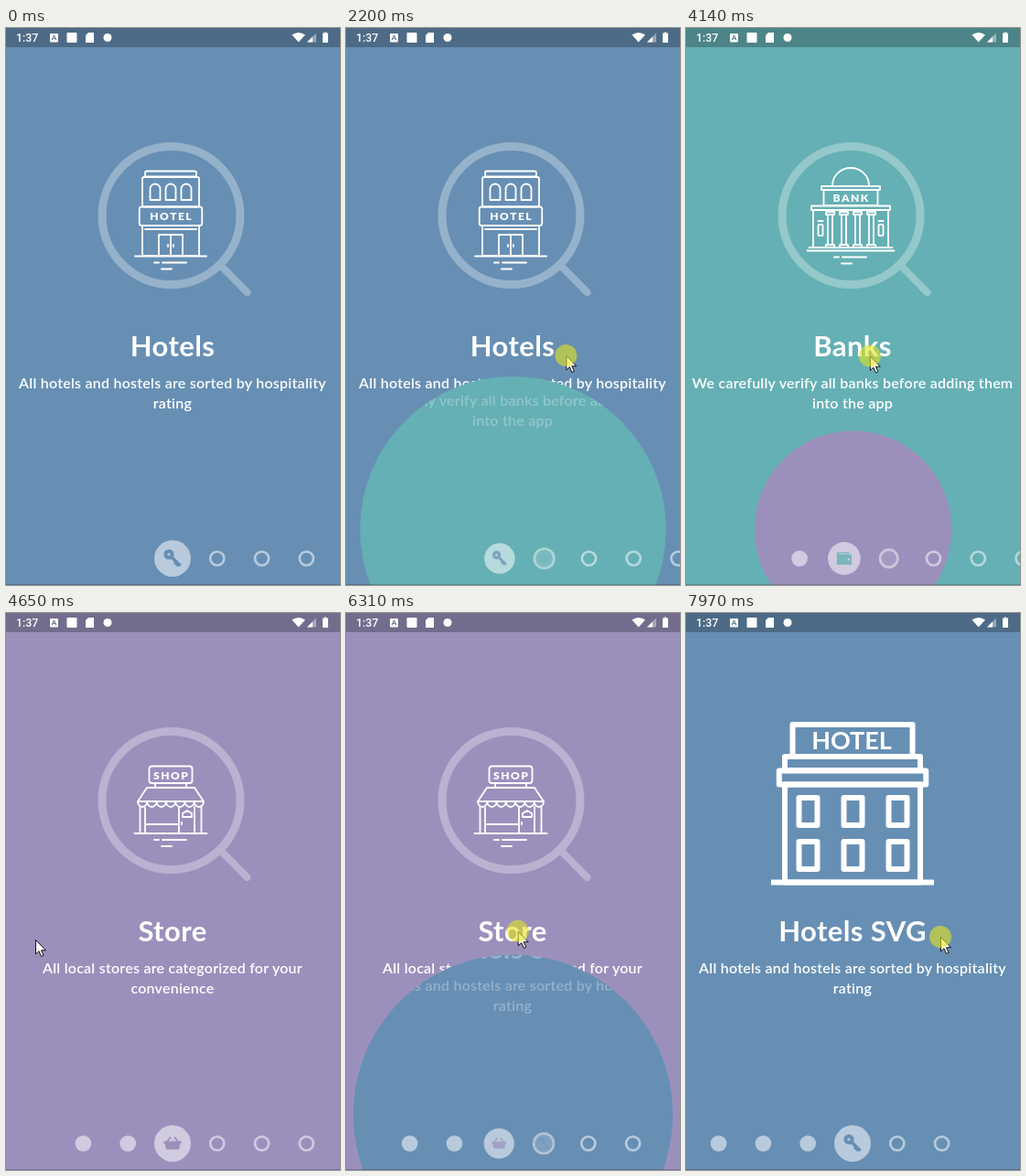
An HTML page that plays this animation: 365x609 px, repeating every 8 s.

```html
<!DOCTYPE html>
<html lang="en">
<head>
<meta charset="utf-8">
<title>Onboarding</title>
<style>
html, body { margin: 0; height: 100%; overflow: hidden; }
svg { display: block; width: 100vw; height: 100vh; }
text { font-family: Lato, "Open Sans", sans-serif; font-weight: 700; fill: #fff; text-anchor: middle; }
.title { font-size: 31px; letter-spacing: .4px; }
.body { font-size: 16px; font-weight: 600; letter-spacing: .24px; }
.sign { font-size: 12px; font-weight: 900; letter-spacing: 1.5px; }
.line { fill: none; stroke: #fff; stroke-width: 1.8; stroke-linecap: round; stroke-linejoin: round; }
.bold { fill: none; stroke: #fff; stroke-width: 6; stroke-linejoin: round; }
.clock { font: 500 12.4px Roboto, sans-serif; text-anchor: start; }
.icon { fill: currentColor; }
.icon .wire { fill: none; stroke: currentColor; }
</style>
</head>
<body>
<svg viewBox="0 0 365 609" preserveAspectRatio="none">
  <defs>
    <clipPath id="reveal"><circle id="hole" cx="182.5" cy="548.1" r="0"/></clipPath>
  </defs>

  <g id="pages"></g>
  <g id="dots"></g>

  <g fill="#fff">
    <rect width="365" height="21" fill="#000" fill-opacity=".25"/>
    <rect y="608" width="365" height="1" fill="#000" fill-opacity=".2"/>
    <text class="clock" x="11" y="15">1:37</text>
    <rect x="48" y="6" width="9" height="9.5" rx="1"/>
    <path d="M50.2 13.3L52.5 7.8L54.8 13.3M51.2 11.6H53.8" fill="none" stroke="#4d6b87"/>
    <rect x="66.5" y="5" width="11" height="11" rx="1"/>
    <path d="M90 5H96V16H87V8Z"/>
    <circle cx="111" cy="10.5" r="4.5"/>
    <path d="M312.5 7.5Q319.7 2.5 327 7.5L319.7 15.5Z"/>
    <path d="M329 15.5L339 5.5V15.5Z" opacity=".4"/>
    <path d="M329 15.5L335 9.5V15.5Z"/>
    <path d="M348 4.5H350V5.5H352V16H346V5.5H348Z"/>
  </g>

  <g id="pointer">
    <path d="M.5 .5V16L4 12.7L6.5 18.5L9 17.4L6.5 11.8H11.5Z" fill="#fff" stroke="#111"/>
    <circle id="press" r="12" fill="#e4e41f" fill-opacity=".6"/>
  </g>
</svg>

<script>
const LOOP = 8000;
const DP = 365 / 411.43;
const CORNER = Math.hypot(182.5, 548.1);
const DRAG = 300 * DP, STEP = 55 * DP;
const OPEN_RATE = 0.005;
const DOT_ALPHA = 0x88 / 255;

const $ = id => document.getElementById(id);
const lerp = (a, b, k) => a + (b - a) * k;
const clamp = v => Math.min(1, Math.max(0, v));
const times = (n, make) => Array.from({ length: n }, (_, i) => make(i)).join('');
const set = (el, attrs) => {
  for (const name in attrs) el.setAttribute(name, attrs[name]);
};

// Pictures are drawn around the vertical axis x = 0
const slab = (y, w, h, r = 0, x = 0) =>
  `<rect x="${x - w / 2}" y="${y}" width="${w}" height="${h}" rx="${r}"/>`;
const path = d => `<path d="${d}"/>`;
const rule = (y, w, x = 0) => path(`M${x - w / 2} ${y}h${w}`);
const ground = (y, w) =>
  rule(y, w) + rule(y + 7, 5, -15.5) + rule(y + 7, 26, 4) + rule(y + 14, 11, -4.5);
const sign = (text, y) => `<text class="sign" x=".7" y="${y}">${text}</text>`;
const drawing = (lines, text) => `
  <g fill="none" stroke="#fff" stroke-linecap="round" opacity=".31">
    <circle cx="180.5" cy="205" r="75.5" stroke-width="9"/>
    <path d="M234 259L263.5 289" stroke-width="8"/>
  </g>
  <g transform="translate(180 0)"><g class="line">${lines}</g>${text}</g>`;

const art = {
  hotel: drawing(
    slab(156.5, 56, 6, 2) + slab(163, 62, 32.5, 2) + slab(195.5, 68.5, 20.5, 2.5) +
    slab(216, 62, 33) + rule(220, 56) + slab(226, 26, 23) + path('M0 226v23M-3 237v2M3 237v2') +
    times(3, i => path(`M${17 * i - 22.5} 188v-12a5.5 5.5 0 0 1 11 0v12z`)) +
    ground(249.5, 78),
    sign('HOTEL', 210)),
  bank: drawing(
    path('M-20 172a20 19 0 0 1 40 0') + slab(173, 64, 4) + slab(177, 59, 17) +
    slab(194.5, 86, 4.5) + slab(199, 82, 41) + rule(240, 91) +
    times(4, i => {
      const x = 15 * i - 22.5;
      return slab(201, 9, 3, 0, x) + slab(204, 5, 33, 0, x) + slab(237, 9, 3, 0, x);
    }) +
    times(2, i => slab(215, 5, 12, 1, 66 * i - 33) + rule(211, 5, 66 * i - 33)) +
    ground(243.5, 95),
    sign('BANK', 190)),
  shop: drawing(
    slab(167.5, 47, 18.5, 3) + path('M-17 186v5M17 186v5M-36 206l10 -15h52l10 15z') +
    path('M-36 206' + times(7, () => `a${36 / 7} 6 0 0 0 ${72 / 7} 0`)) +
    path('M-33.5 211v30M33.5 211v30M-28 213v18H8M9 212v29M26 212v29M-28 231v10M12 229v2') +
    path('M13 223h10v-4l-5 -3l-5 3z') +
    ground(241, 79),
    sign('SHOP', 181.5)),
  block: `
    <g transform="translate(182 0)">
      <g class="bold">
        ${slab(122, 131, 35) + slab(157, 148, 15) + slab(172.5, 160.5, 15) + slab(187.5, 148, 107)}
        ${rule(294.5, 178)}
        ${times(6, i => slab(202 + 48 * (i / 3 | 0), 20, 30, 0, 49 * (i % 3) - 48.5))}
      </g>
      <text x="-1" y="149" font-size="27">HOTEL</text>
    </g>`,
};

const icons = {
  key: `<circle class="wire" cx="-4" cy="-4.5" r="3.6" stroke-width="4"/>
    <path class="wire" d="M-1 -1.5L8.5 8" stroke-width="3.6"/><path d="M2 3l5 4l-2 2l-4 -4z"/>`,
  wallet: `<path fill-rule="evenodd" d="M-9 -7.500H6V-6H-7V-5H9V7.500H-9ZM4 1a1.500 1.500 0 0 0 3 0a1.500 1.500 0 0 0 -3 0Z"/>`,
  basket: `<path class="wire" d="M-6 -2L-2 -7M6 -2L2 -7" stroke-width="2"/>
    <path d="M-9.500 -2.500H9.500V0H8.500L7 6.500H-7L-8.500 0H-9.500Z"/>`,
};

const hotelText = ['All hotels and hostels are sorted by hospitality', 'rating'];
const pages = [
  { color: '#678fb4', art: 'hotel', icon: 'key', title: 'Hotels', lines: hotelText },
  { color: '#65b0b4', art: 'bank', icon: 'wallet', title: 'Banks',
    lines: ['We carefully verify all banks before adding them', 'into the app'] },
  { color: '#9b90bc', art: 'shop', icon: 'basket', title: 'Store',
    lines: ['All local stores are categorized for your', 'convenience'] },
  { color: '#678fb4', art: 'block', icon: 'key', title: 'Hotels SVG', lines: hotelText },
];

// Pointer moves; those with a pull exponent hold the button and drag the page
const moves = [
  { at: 1210, ms: 380, x: 327, y: 359 },
  { at: 1950, ms: 930, x: 80, y: 356, pull: 0.8, slop: 9.6 },
  { at: 2930, ms: 310, x: 265, y: 359 },
  { at: 3630, ms: 950, x: 32, y: 357, pull: 2.08, slop: 14.5 },
  { at: 5100, ms: 470, x: 284, y: 346 },
  { at: 5850, ms: 1050, x: 77, y: 350, pull: 0.93, slop: 15.8 },
  { at: 7240, ms: 500, x: 278, y: 354 },
  { at: 7970, ms: 30, x: 278, y: 354, pull: 1, slop: 0 },
];

$('pages').innerHTML = pages.map(p => `
  <g>
    <rect width="365" height="609" fill="${p.color}"/>
    <g>
      <g>${art[p.art]}</g>
      <g>
        <text class="title" x="182" y="359">${p.title}</text>
        ${p.lines.map((line, i) => `<text class="body" x="182" y="${394 + 22 * i}">${line}</text>`).join('')}
      </g>
    </g>
  </g>`).join('');

$('dots').innerHTML = times(6, i => `
  <g>
    <circle fill="#fff"/>
    <circle fill="none" stroke="#fff" stroke-width="${3 * DP}"/>
    <g class="icon" color="${pages[i]?.color}">${icons[pages[i]?.icon] || ''}</g>
  </g>`);

const pageEls = [...$('pages').children];
const dotEls = [...$('dots').children];

const bezier = (a, b, c, d, k) => {
  const j = 1 - k;
  return a * j ** 3 + 3 * b * j * j * k + 3 * c * j * k * k + d * k ** 3;
};

function stateAt(t) {
  const k = clamp((t - 390) / 740);
  let x = bezier(241, 110, 230, 285, k);
  let y = t < 210 ? 592 : bezier(576, 250, 0, 311, k);
  let active = 0, slide = 0, down = false;
  for (const m of moves) {
    if (t < m.at) break;
    const k = clamp((t - m.at) / m.ms);
    const eased = m.pull ? k ** m.pull : 1 - (1 - k) ** 3;
    const x0 = x;
    x = lerp(x, m.x, eased);
    y = lerp(y, m.y, eased);
    if (!m.pull) continue;
    down = k < 1;
    slide = clamp((x0 - x - m.slop) / DRAG) + Math.max(0, t - m.at - m.ms) * OPEN_RATE;
    if (slide >= 1) {
      active++;
      slide = 0;
    }
  }
  return { x, y, active, slide, down };
}

function drawPages(active, slide) {
  $('hole').setAttribute('r', CORNER * slide);
  pageEls.forEach((el, i) => {
    const next = i === active + 1 && slide > 0;
    const shown = next ? slide : 1;
    el.style.display = i === active || next ? '' : 'none';
    set(el, { 'clip-path': next ? 'url(#reveal)' : 'none' });
    const content = el.children[1];
    const [picture, words] = content.children;
    set(content, { opacity: shown });
    set(picture, { transform: `translate(0 ${50 * DP * (1 - shown)})` });
    set(words, { transform: `translate(0 ${30 * DP * (1 - shown)})` });
  });
}

function drawDots(active, slide) {
  dotEls.forEach((el, i) => {
    const on = i === active ? 1 - slide : i === active + 1 ? slide : 0;
    const hollow = i > active;
    const r = lerp(20, 45, on) * DP / 2;
    const [fill, ring, icon] = el.children;
    set(el, { transform: `translate(${182 + (i - active - slide) * STEP} 580)` });
    set(fill, { r, opacity: DOT_ALPHA * (hollow ? on : 1) });
    set(ring, { r: r - 1.5 * DP, opacity: hollow ? DOT_ALPHA * (1 - on) : 0 });
    set(icon, { opacity: on, transform: `scale(${r / (22.5 * DP)})` });
  });
}

function draw(t) {
  const { x, y, active, slide, down } = stateAt(t);
  drawPages(active, slide);
  drawDots(active, slide);
  set($('pointer'), { transform: `translate(${x} ${y})` });
  $('pointer').style.display = t < 160 ? 'none' : '';
  $('press').style.display = down ? '' : 'none';
}

const start = performance.now();
function frame() {
  draw((performance.now() - start) % LOOP);
  requestAnimationFrame(frame);
}
frame();
</script>
</body>
</html>
```
